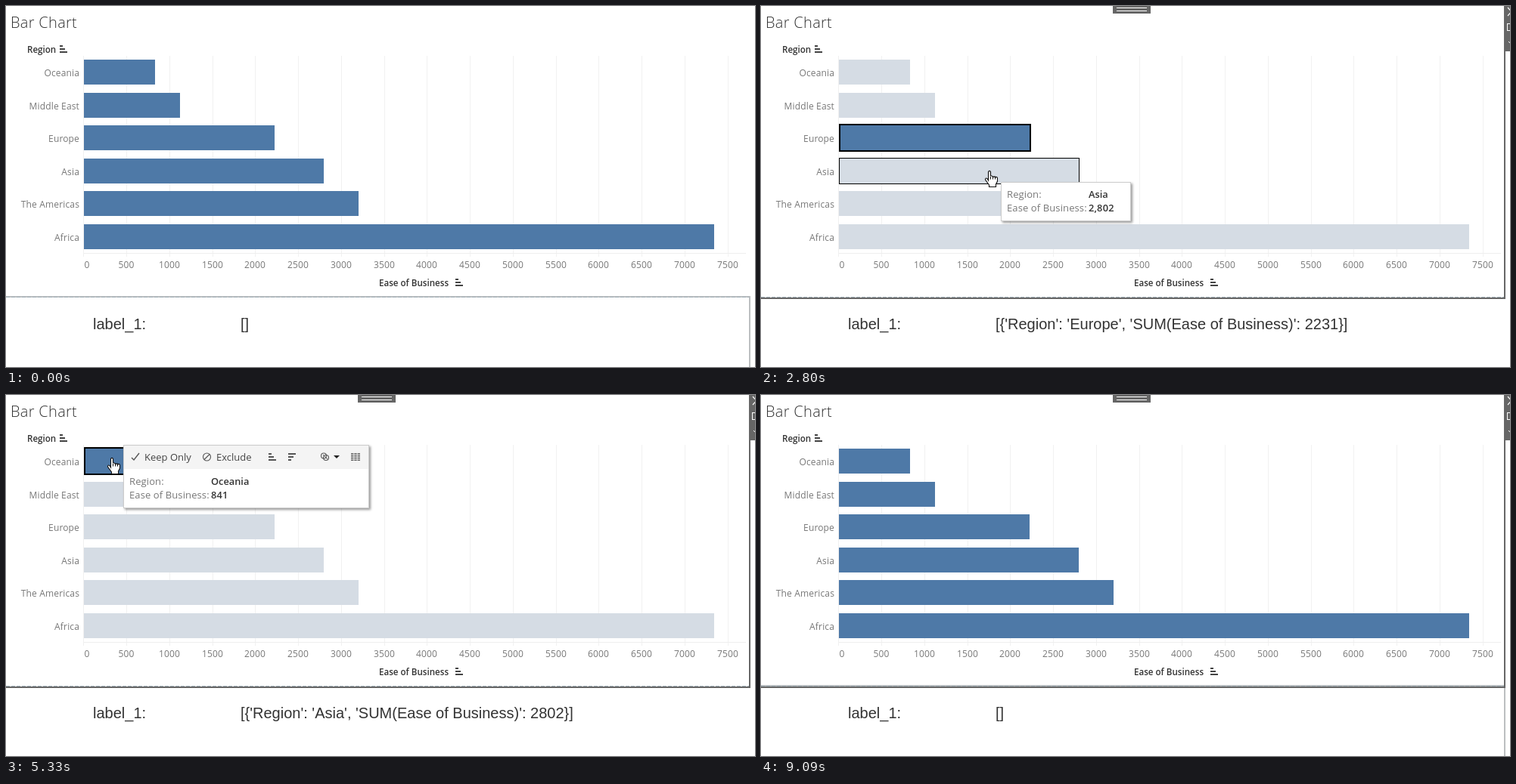
An HTML page with a canvas that plays this animation: 990x478 px, repeating every 9140 ms.

```html
<!DOCTYPE html>
<html lang="en">
<head>
<meta charset="utf-8">
<title>Bar Chart</title>
<style>
  html, body { margin: 0; width: 100%; height: 100%; overflow: hidden; background: #fff; }
  canvas { display: block; }
</style>
</head>
<body>
<canvas id="stage" width="990" height="478"></canvas>
<script>
const ctx = document.getElementById('stage').getContext('2d');
const LOOP = 9140;
const SANS = '"Open Sans", "Noto Sans", sans-serif';
const BLUE = '#4e79a7', DIM = '#d5dce4', DARK = '#666', LIGHT = '#bcbfc1';
const LEFT = 103, BAR_H = 33;

const rows = [
  ['Oceania', 841, 197], ['Middle East', 1125, 230], ['Europe', 2231, 355],
  ['Asia', 2802, 420], ['The Americas', 3205, 466], ['Africa', 7346, 936]
].map(([name, value, right], i) => ({ name, value, right, y: Math.round(71 + i * 43.55) }));
const [OCEANIA, MIDDLE, EUROPE, ASIA] = [0, 1, 2, 3];

// Pointer path: time, x, y
const path = [
  [1060, 936, 204], [1480, 407, 190], [1630, 407, 190], [1730, 345, 181], [1780, 338, 181],
  [1950, 317, 181], [2550, 317, 181], [2750, 302, 217], [4070, 302, 217], [4450, 202, 138],
  [4550, 202, 138], [4720, 140, 82], [5750, 140, 82], [6050, 63, 131], [6400, 63, 131],
  [6550, 72, 137], [6710, 72, 137], [6810, 150, 142], [7110, 781, 126], [8320, 781, 126],
  [8600, 930, 245], [8940, 968, 477]
];

// Selected row, the time of the click, and when its toolbar opens and closes
const clicks = [
  { at: 2150, row: EUROPE, open: 2300, close: 2600 },
  { at: 3310, row: ASIA, open: 3410, close: 4120 },
  { at: 4980, row: OCEANIA, open: 5080, close: 5800 },
  { at: 6100, row: MIDDLE, open: 6200, close: 7310, header: true },
  { at: 7510, row: -1 }
];
const labels = [[0, -1], [2550, EUROPE], [3610, ASIA], [5630, OCEANIA], [6300, MIDDLE], [7660, -1]];

function pointerAt(t) {
  if (t <= path[0][0]) return { x: path[0][1], y: path[0][2] };
  const i = path.findIndex(k => k[0] > t);
  if (i < 0) return { x: path.at(-1)[1], y: path.at(-1)[2] };
  const [t0, x0, y0] = path[i - 1], [t1, x1, y1] = path[i];
  const u = (t - t0) / (t1 - t0);
  return { x: Math.round(x0 + (x1 - x0) * u), y: Math.round(y0 + (y1 - y0) * u) };
}

const rowUnder = p => rows.findIndex(r =>
  p.x >= LEFT && p.x <= r.right && p.y >= r.y && p.y < r.y + BAR_H);

function rect(x, y, w, h, color) {
  ctx.fillStyle = color;
  ctx.fillRect(x, y, w, h);
}

function outline(x, y, w, h, color, width = 1) {
  ctx.strokeStyle = color;
  ctx.lineWidth = width;
  ctx.strokeRect(x, y, w, h);
}

function text(str, x, y, font, color, align = 'left', spacing = 0) {
  ctx.font = font;
  ctx.letterSpacing = spacing + 'px';
  ctx.textAlign = align;
  ctx.fillStyle = color;
  ctx.fillText(str, x, y);
}

function line(points, color, width = 1) {
  ctx.strokeStyle = color;
  ctx.lineWidth = width;
  ctx.beginPath();
  points.forEach(([x, y]) => ctx.lineTo(x, y));
  ctx.stroke();
}

function ring(x, y, r, color) {
  ctx.strokeStyle = color;
  ctx.lineWidth = 1.1;
  ctx.beginPath();
  ctx.arc(x, y, r, 0, 7);
  ctx.stroke();
}

function polygon(points, fill, stroke) {
  ctx.beginPath();
  points.forEach(([x, y]) => ctx.lineTo(x, y));
  ctx.closePath();
  ctx.fillStyle = fill;
  ctx.fill();
  if (stroke) {
    ctx.strokeStyle = stroke;
    ctx.lineWidth = 1;
    ctx.stroke();
  }
}

function sortIcon(x, y, color = '#444', flip = false) {
  [4, 7, 10].forEach((w, i) => rect(x, y + (flip ? 2 - i : i) * 4, w, 2, color));
}

function drawAxes() {
  for (let i = 0; i <= 15; i++) {
    const x = Math.round(102.4 + i * 56.74);
    rect(x, 66, 1, 266, '#f1f1f1');
    text(String(i * 500), i ? x : 107, 347, `12px ${SANS}`, '#787878', 'center', 0.2);
  }
  rect(LEFT, 327, 875, 1, '#eee');
  text('Bar Chart', 6, 29, `300 20px ${SANS}`, '#333', 'left', 0.3);
  text('Region', 28, 62, `600 11.6px ${SANS}`, '#333');
  sortIcon(71, 52);
  text('Ease of Business', 493, 371, `600 11.6px ${SANS}`, '#333');
  sortIcon(594, 361);
}

function drawBars(click, hover) {
  const selected = click ? click.row : -1;
  rows.forEach((r, i) => {
    const isSelected = i === selected;
    const w = r.right - LEFT;
    if (isSelected && click.header) rect(2, 110, 100, 43, '#8dc4d3');
    text(r.name, 97, r.y + 22, `12px ${SANS}`, isSelected && click.header ? '#444' : '#787878', 'right', 0.15);
    rect(LEFT, r.y, w, BAR_H, selected < 0 || isSelected ? BLUE : DIM);
    if (isSelected && !click.header) outline(LEFT + 1, r.y - 1, w, BAR_H + 2, '#000', 2);
    else if (i === hover) outline(LEFT + 0.5, r.y - 0.5, w, BAR_H + 1, '#000');
  });
}

function drawFrames(t) {
  const upper = t >= 910, active = t >= clicks[0].at, lower = t < 200 || t >= 8840;
  if (lower) {
    rect(0, 384, 984, 2, LIGHT);
    rect(982, 386, 2, 92, LIGHT);
  }
  if (upper) {
    const color = active ? DARK : LIGHT;
    rect(0, 386, 984, 2, color);
    rect(982, 0, 2, 388, color);
  }
  ctx.setLineDash([5, 2]);
  line([[0, 385.5], [982, 385.5]], '#a3b1b9');
  ctx.setLineDash([]);
  if (!active) return;
  rect(465, 0, 50, 10, DARK);
  [2, 6].forEach(y => rect(470, y, 40, 1, '#fff'));
  rect(983, 0, 7, 60, DARK);
  line([[987, 2], [992, 7.5], [987, 13]], '#fff', 1.2);
  outline(986.5, 23.5, 8, 9, '#fff');
  line([[988, 47], [991, 50]], '#fff');
}

function panel(x, y, w, h) {
  ctx.save();
  ctx.shadowColor = 'rgba(0,0,0,.4)';
  ctx.shadowBlur = 3;
  ctx.shadowOffsetX = ctx.shadowOffsetY = 2;
  rect(x, y, w, h, '#fff');
  ctx.restore();
  outline(x + 0.5, y + 0.5, w - 1, h - 1, '#ccc');
}

function toolbar(x, y, w, sorts) {
  const ink = '#555', font = `13px ${SANS}`, right = x + w, mid = y + 16;
  rect(x + 1, y + 1, w - 2, 31, '#f4f4f4');
  line([[x + 11, mid + 1], [x + 14, mid + 4], [x + 21, mid - 5]], ink, 1.4);
  text('Keep Only', x + 28, y + 21, font, '#444');
  ring(x + 110.5, mid, 5, ink);
  line([[x + 107, mid + 3.5], [x + 114, mid - 3.5]], ink, 1.1);
  text('Exclude', x + 123, y + 21, font, '#444');
  if (sorts) {
    sortIcon(x + 192, mid - 5, ink);
    sortIcon(x + 218, mid - 5, ink, true);
  }
  ring(right - 60, mid - 1.5, 3.5, ink);
  ring(right - 57, mid + 1, 3.5, ink);
  line([[right - 61, mid - 3], [right - 55, mid + 3]], ink);
  polygon([[right - 47, mid - 2], [right - 39, mid - 2], [right - 43, mid + 2]], '#222');
  for (let i = 0; i < 15; i++) {
    rect(right - 24 + (i % 3) * 4.3, mid - 5 + Math.floor(i / 3) * 2.2, 3.4, 1.2, ink);
  }
}

function markTip(row, p, withTools) {
  const x = p.x + 15, y = p.y + 16;
  const bold = `600 12.8px ${SANS}`, plain = `13px ${SANS}`;
  ctx.font = bold;
  ctx.letterSpacing = '0px';
  const w = withTools ? 325 : Math.max(172, Math.round(128 + ctx.measureText(row.name).width));
  const top = withTools ? y - 32 : y;
  panel(x, top, w, y + 52 - top);
  if (withTools) toolbar(x, top, w, true);
  text('Region:', x + 8, y + 21, plain, '#787878', 'left', 0.1);
  text('Ease of Business:', x + 8, y + 39, plain, '#787878', 'left', 0.1);
  text(row.name, x + 116, y + 21, bold, '#333');
  text(row.value.toLocaleString('en-US'), x + 116, y + 39, bold, '#333', 'left', 0.2);
}

function headerTip(name) {
  panel(79, 147, 258, 65);
  toolbar(79, 147, 258, false);
  text(name, 87, 200, `13px ${SANS}`, '#333', 'left', 0.2);
}

function drawTip(t, click, hover) {
  const open = click && t >= click.open && t < click.close;
  if (open && click.header) return headerTip(rows[click.row].name);
  const p = pointerAt(t - 50);
  const row = rowUnder(p);
  if (hover >= 0 && (row === hover || row < 0)) markTip(rows[hover], p, open && click.row === hover);
}

function drawArrow() {
  polygon([[0.5, 0.5], [0.5, 16.5], [4, 13], [6.5, 18.5], [9, 17.5], [6.7, 12], [11.5, 12]], '#fff', '#111');
}

function drawHand() {
  ctx.translate(0, 1);
  ctx.beginPath();
  ctx.moveTo(-1.5, 13);
  ctx.lineTo(-1.5, 1.5);
  ctx.quadraticCurveTo(0, -0.8, 1.5, 1.5);
  ctx.lineTo(1.5, 6.5);
  for (const x of [4.5, 7.5, 10.5]) ctx.quadraticCurveTo(x - 1, 5.5 + x / 6, x, 8 + x / 6);
  ctx.lineTo(10.5, 14);
  ctx.lineTo(8.5, 18);
  ctx.lineTo(8.5, 21.5);
  ctx.lineTo(-0.5, 21.5);
  ctx.lineTo(-0.5, 19);
  ctx.lineTo(-5.5, 12);
  ctx.quadraticCurveTo(-5.5, 9, -3, 10.5);
  ctx.closePath();
  ctx.fillStyle = '#fff';
  ctx.fill();
  ctx.strokeStyle = '#111';
  ctx.lineWidth = 1.1;
  ctx.stroke();
  [1.5, 4.5, 7.5].forEach(x => line([[x, 7.5], [x, 11.5]], '#111'));
}

function drawPointer(p, hand) {
  ctx.save();
  ctx.translate(p.x, p.y);
  if (hand) drawHand();
  else drawArrow();
  ctx.restore();
}

function drawLabel(t) {
  const row = rows[labels.findLast(l => t >= l[0])[1]];
  const font = '20px "Liberation Sans", Arial, sans-serif';
  const value = row ? `[{'Region': '${row.name}', 'SUM(Ease of Business)': ${row.value}}]` : '[]';
  text('label_1:', 115, 428, font, '#333');
  text(value, 310, 428, font, '#333');
}

function draw(t) {
  const shown = t >= 1110 && t < 9090;
  const p = pointerAt(t);
  const hover = shown ? rowUnder(p) : -1;
  const click = clicks.findLast(c => t >= c.at);
  rect(0, 0, 990, 478, '#fff');
  drawAxes();
  drawBars(click, hover);
  drawFrames(t);
  drawLabel(t);
  drawTip(t, click, hover);
  if (shown) drawPointer(p, hover >= 0);
}

const start = performance.now();
function tick() {
  draw((performance.now() - start) % LOOP);
  requestAnimationFrame(tick);
}
tick();
</script>
</body>
</html>
```
